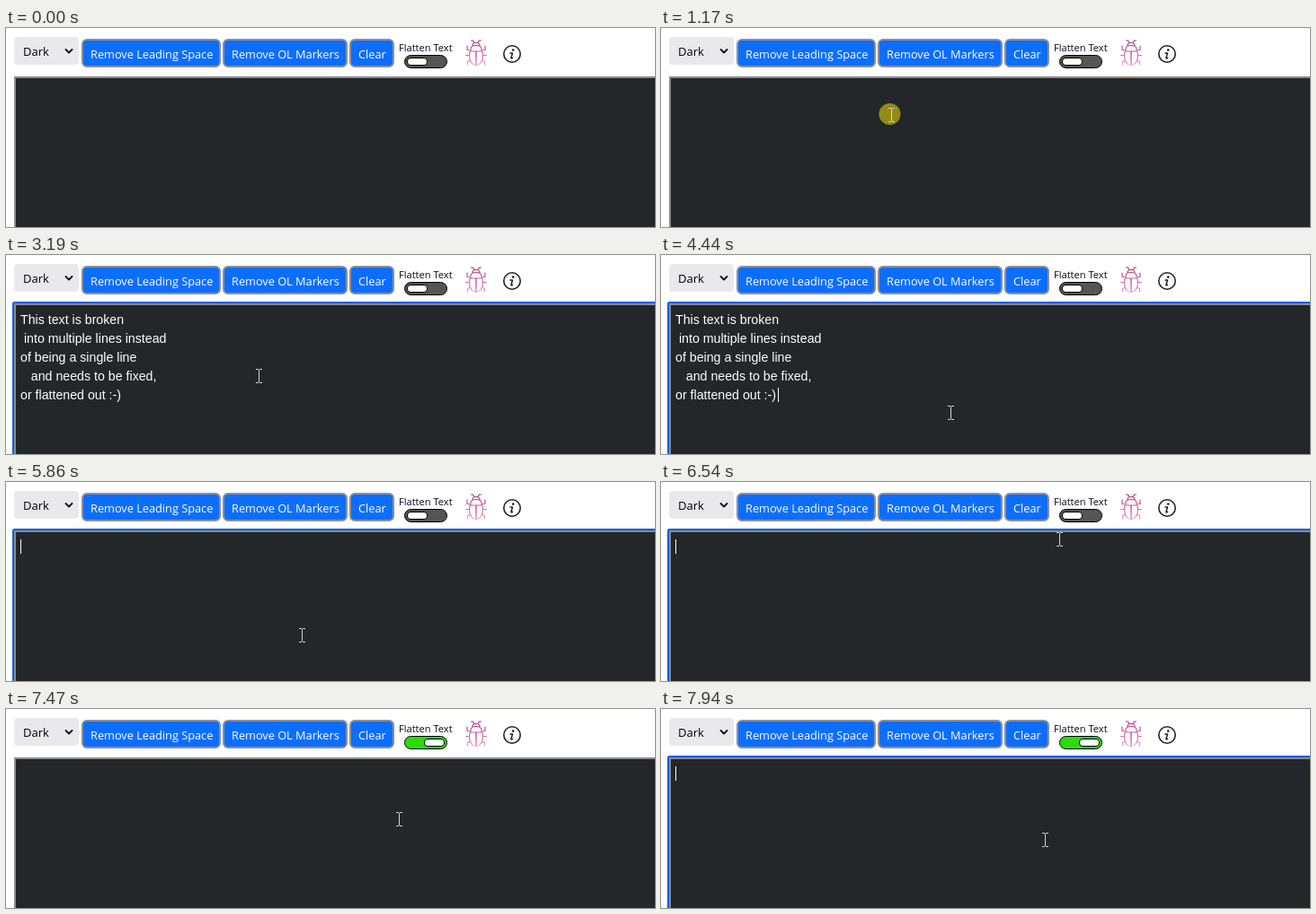
Animation of 722 by 222 pixels, one loop 8 s. Source, as an HTML page:

```html
<!DOCTYPE html>
<html lang="en">
<head>
<meta charset="utf-8">
<title>Flatten text</title>
<style>
html, body { margin: 0; width: 100%; height: 100%; overflow: hidden; background: #fff; }
svg { display: block; width: 722px; height: 222px; }
.ui { font-family: "Open Sans", "Noto Sans", sans-serif; font-size: 12.75px; }
.btn { fill: #0d6efd; stroke: #8f8f96; stroke-width: 2; }
#text { font: 14.2px "Liberation Sans", Arial, sans-serif; fill: #fff; white-space: pre; }
.line { fill: none; stroke-linecap: round; stroke-linejoin: round; }
.ptr { fill: #fff; stroke: #000; stroke-linejoin: round; }
</style>
</head>
<body>
<svg viewBox="0 0 722 222">
  <defs>
    <linearGradient id="pink" gradientUnits="userSpaceOnUse" x1="0" y1="14" x2="0" y2="42">
      <stop offset="0" stop-color="#a8327e"/>
      <stop offset="1" stop-color="#ee9fd0"/>
    </linearGradient>
  </defs>

  <g class="ui">
    <rect x="9" y="10" width="72" height="31" rx="4" fill="#e9e9ed"/>
    <text x="19" y="31" font-size="13" fill="#000">Dark</text>
    <path class="line" d="M66.5 24l3.5 3.500 3.500-3.500" stroke="#111" stroke-width="1.800"/>
    <g id="buttons"></g>
    <text x="437" y="26" font-size="11.100" fill="#0a0a1e">Flatten Text</text>
  </g>

  <rect id="track" x="443.5" y="30.5" width="47" height="14" rx="7" stroke="#000"/>
  <rect id="knob" y="33.5" width="22" height="8" rx="3.5" fill="#fff" stroke="#000"/>

  <g class="line" stroke="url(#pink)" stroke-width="1.2" transform="translate(523 0)">
    <path id="half" d="M0 26h-7q-1.500 9 2 13 2 2.500 5 2.500zM-6 25.500v-2q0-4 6-4M-4 19.500q0-3 4-3
      M-2 16.500l-1.500-2.500h-2M-7.500 24.500h-2.500v-4.500M-7.500 30.500h-4M-6.500 36l-3 1.500v3.500"/>
    <use href="#half" transform="scale(-1 1)"/>
  </g>

  <circle cx="563" cy="29" r="9.2" fill="none" stroke="#222" stroke-width="1.6"/>
  <circle cx="564.2" cy="24.6" r="1.3" fill="#222"/>
  <path class="line" d="M561 28h2.500l-1.600 5.500q0 .8 1.600-.2" stroke="#222" stroke-width="1.5"/>

  <rect id="ring" x="8" y="53" width="800" height="300" rx="1.5" fill="none" stroke="#0060df" stroke-width="2"/>
  <rect x="10" y="55" width="800" height="300" fill="#23272a" stroke="#8a8a8a" stroke-width="2"/>
  <g id="text"></g>
  <rect id="caret" width="1" height="16" fill="#fff"/>

  <g id="cursor">
    <circle id="click" cx="-2" cy="-1" r="12" fill="#fff000" fill-opacity=".5"/>
    <path id="beam" d="M-3.500-7.500h3m1 0h3M0-7v14M-3.500 7.500h3m1 0h3" fill="none" stroke="#d4d4d4"/>
    <path id="arrow" class="ptr" stroke-width=".8" d="M0 0v15.500l3.500-3.300 2.700 6.200 2.600-1.100-2.700-6.100h4.900z"/>
    <path id="hand" class="ptr" d="M-1.500 1q1.500-1.500 3 0v6q1.700-1 3 .4q1.700-.9 3 .6q2-.5 2.500 1.300v5q0 3-2 5v2.700h-8v-2.700l-4-5.500q-2-2.500-2-3.700q1.200-1.600 3 0l1.500 1.800z"/>
  </g>
</svg>

<script>
const LOOP = 8000, STEP = 77, BLINK = 526;
const FOCUS = 1250, PASTE = 2410, CLEAR = 5860, BLUR = 6770, SWITCH = 6840, REFOCUS = 7940;

const $ = id => document.getElementById(id);
const set = (id, attrs) => {
  for (const k in attrs) $(id).setAttribute(k, attrs[k]);
};
const show = (id, on) => set(id, { visibility: on ? "visible" : "hidden" });
const within = (t, a, b) => t >= a && t < b;
const clamp = p => Math.min(1, Math.max(0, p));

let left = 84;
$("buttons").innerHTML = ["Remove Leading Space", "Remove OL Markers", "Clear"].map(label => {
  $("buttons").innerHTML = `<text>${label}</text>`;
  const w = Math.round($("buttons").firstChild.getComputedTextLength()) + 19, x = left;
  left += w + 2;
  return `<rect class="btn" x="${x + 1}" y="13" width="${w - 2}" height="30" rx="5"/>
    <text x="${x + 10}" y="34" fill="#fff">${label}</text>`;
}).join("");

$("text").innerHTML = [
  "This text is broken",
  " into multiple lines instead",
  "of being a single line",
  "   and needs to be fixed,",
  "or flattened out :-)"
].map((s, i) => `<text x="16" y="${77 + 21 * i}" xml:space="preserve">${s}</text>`).join("");

// Pointer moves: start, end, target x, target y
const moves = [
  [700, 1170, 256, 97],
  [1570, 1950, 275, 124],
  [2960, 3190, 281, 135],
  [3360, 3590, 110, 164],
  [4140, 4440, 322, 176],
  [4930, 5310, 329, 171],
  [6010, 6770, 474, 35],
  [7155, 7710, 427, 146]
];

// The pointer is sampled once per STEP and sits on whole pixels.
function pointer(t) {
  const now = Math.ceil(t / STEP) * STEP;
  let x = 300, y = 240;
  for (const [a, b, ex, ey] of moves) {
    const p = clamp((now - a) / (b - a)), e = p * p * (3 - 2 * p);
    x += (ex - x) * e;
    y += (ey - y) * e;
  }
  return [Math.round(x) + .5, Math.round(y)];
}

function draw(t) {
  const focus = within(t, FOCUS, BLUR) || t >= REFOCUS;
  const pasted = within(t, PASTE, CLEAR);
  const since = t - (t < REFOCUS ? FOCUS : REFOCUS);
  show("ring", focus);
  show("text", pasted);
  show("caret", focus && Math.floor(since / BLINK) % 2 === 0);
  set("caret", pasted ? { x: 130, y: 148 } : { x: 16, y: 64 });

  const p = clamp((t - SWITCH) / 300);
  set("track", { fill: t >= SWITCH ? "#2bdb0d" : "#555" });
  set("knob", { x: 446.5 + 19 * (1 - (1 - p) ** 2) });

  const [x, y] = pointer(t);
  const on = t >= 700;
  const hand = y < 45 && within(x, 443, 491);
  const arrow = !hand && (y < 54 || within(t, 2260, 2960));
  set("cursor", { transform: `translate(${x} ${y})` });
  show("hand", on && hand);
  show("arrow", on && arrow);
  show("beam", on && !hand && !arrow);
  show("click", [FOCUS, SWITCH, REFOCUS].some(end => within(t, end - 80, end)));
}

const start = performance.now();
function tick() {
  draw((performance.now() - start) % LOOP);
  requestAnimationFrame(tick);
}
tick();
</script>
</body>
</html>
```
